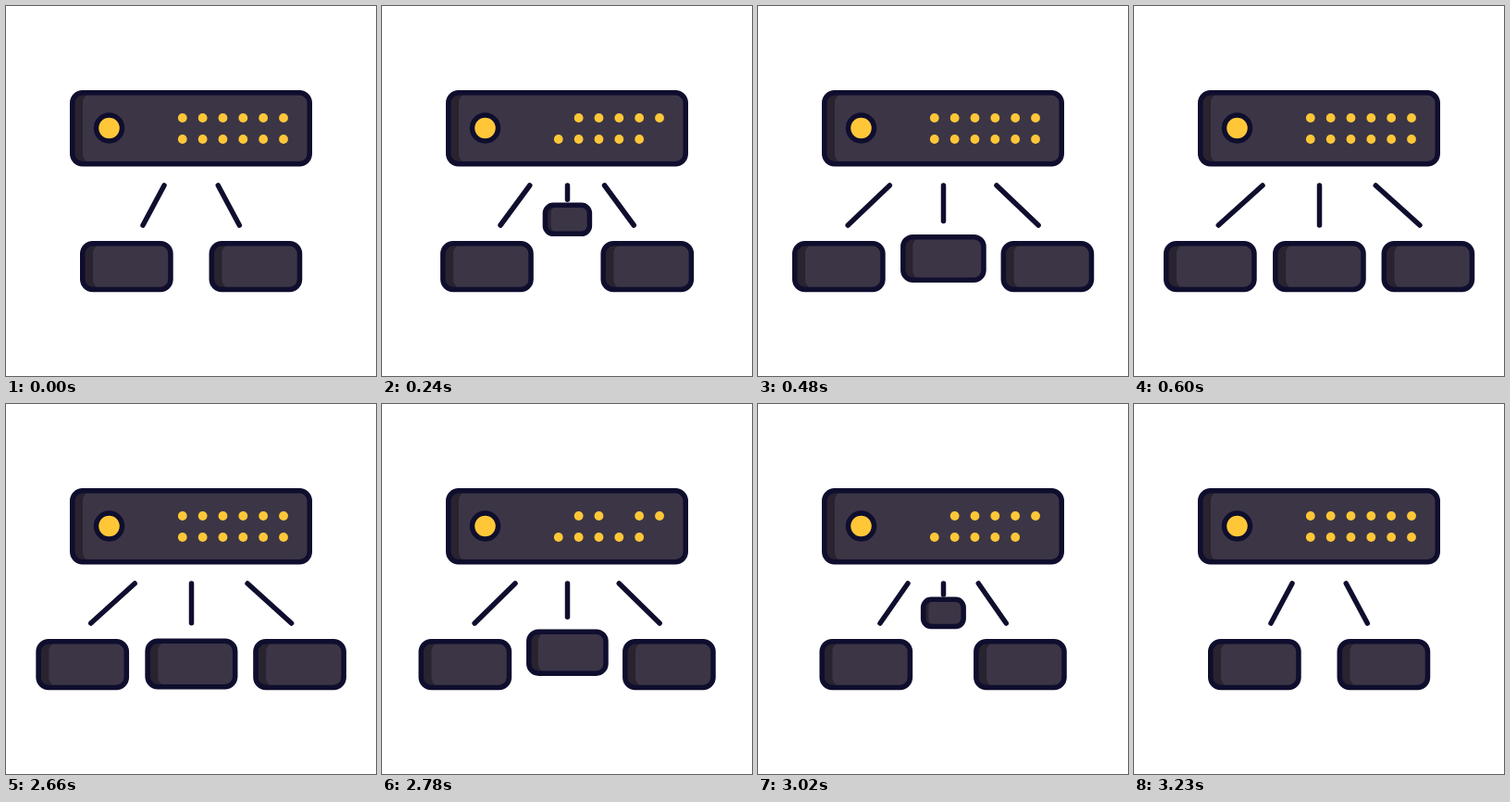
An HTML page that plays this animation: 400x400 px, repeating every 4.26 s.

```html
<!DOCTYPE html>
<html lang="en">
<head>
<meta charset="utf-8">
<title>Network switch</title>
<style>
  html, body { margin: 0; width: 100%; height: 100%; overflow: hidden; background: #fff; }
  svg { display: block; width: 100%; height: 100%; }
  .shade { fill: #28232f; }
  .face { fill: #3c3546; }
  .edge, .link { fill: none; stroke: #0f0e2e; stroke-width: 5.5; stroke-linecap: round; stroke-linejoin: round; }
  .light { fill: #ffc738; }
</style>
</head>
<body>
<svg id="stage" viewBox="0 0 400 400"></svg>
<script>
const LOOP = 4260, STEP = 30, TRAVEL = 600, CLOSE_AT = 2660;
const stage = document.getElementById('stage');

function add(tag, className, attrs = {}, parent = stage) {
  const node = document.createElementNS('http://www.w3.org/2000/svg', tag);
  node.setAttribute('class', className);
  parent.append(node);
  return set(node, attrs);
}

function set(node, attrs) {
  for (const key in attrs) node.setAttribute(key, attrs[key]);
  return node;
}

const mix = (a, b, p) => a + (b - a) * p;
const smooth = x => {
  const c = Math.min(1, Math.max(0, x));
  return c * c * (3 - 2 * c);
};

// A rounded case with a shaded strip along its left side.
function makeCase() {
  const group = add('g', 'case');
  const [shade, face, edge] = ['shade', 'face', 'edge'].map(c => add('rect', c, {}, group));
  return {
    group,
    shape(x, y, width, height, strip = 11.25, rx = 11) {
      const box = { x, y, width, height, rx };
      set(shade, box);
      set(edge, box);
      set(face, { x: x + strip, y, width: width - strip, height, rx });
    }
  };
}

const links = [0, 1, 2].map(() => add('path', 'link'));
const drawLink = (link, x1, x2, y2) => set(link, { d: `M${x1} 194L${x2} ${y2}` });

makeCase().shape(71.75, 93.75, 256.5, 77);
add('circle', 'light', { cx: 111.5, cy: 132, r: 13 });
add('circle', 'edge', { cx: 111.5, cy: 132, r: 14 });

const lights = [121, 144].map(cy =>
  [0, 1, 2, 3, 4, 5].map(i => add('circle', 'light', { cx: 190.8 + 21.84 * i, cy, r: 4.9 })));

const blinks = [
  { light: lights[0][0], from: 120, to: 480 },
  { light: lights[1][5], from: 120, to: 480 },
  { light: lights[0][3], from: 300, to: 480 }
];

const left = makeCase(), middle = makeCase(), right = makeCase();

// Travel position in ms: opens, holds, closes along the same path, holds.
function travelTime(t) {
  if (t < CLOSE_AT) return Math.min(TRAVEL, Math.floor(t / STEP) * STEP);
  const steps = Math.floor((t - CLOSE_AT) / STEP) + 1;
  return Math.max(0, TRAVEL - steps * STEP);
}

function draw(time) {
  const p = smooth(time / TRAVEL);
  drawLink(links[0], mix(171, 139, p), mix(148, 91.3, p), 237);
  drawLink(links[1], 200.5, 200.5, mix(194, 237, p));
  drawLink(links[2], mix(229.3, 261.3, p), mix(252.3, 309, p), 237);
  links[1].style.display = time > 0 ? '' : 'none';

  left.shape(mix(82.75, 34.75, p), 256.75, 95.2, 49.7);
  right.shape(mix(222.3, 270.3, p), 256.75, 95.2, 49.7);

  const delay = 60;
  const q = smooth((time - delay) / (TRAVEL - delay));
  const w = mix(31.5, 95.2, q), h = mix(24.5, 49.7, q);
  middle.group.style.display = time >= delay ? '' : 'none';
  middle.shape(200.4 - w / 2, mix(213, 281.6, q) - h / 2, w, h, mix(4.5, 11.25, q), mix(8, 11, q));

  for (const { light, from, to } of blinks) {
    light.style.display = time >= from && time < to ? 'none' : '';
  }
}

const start = performance.now();
function tick() {
  draw(travelTime((performance.now() - start) % LOOP));
  requestAnimationFrame(tick);
}
tick();
</script>
</body>
</html>
```
